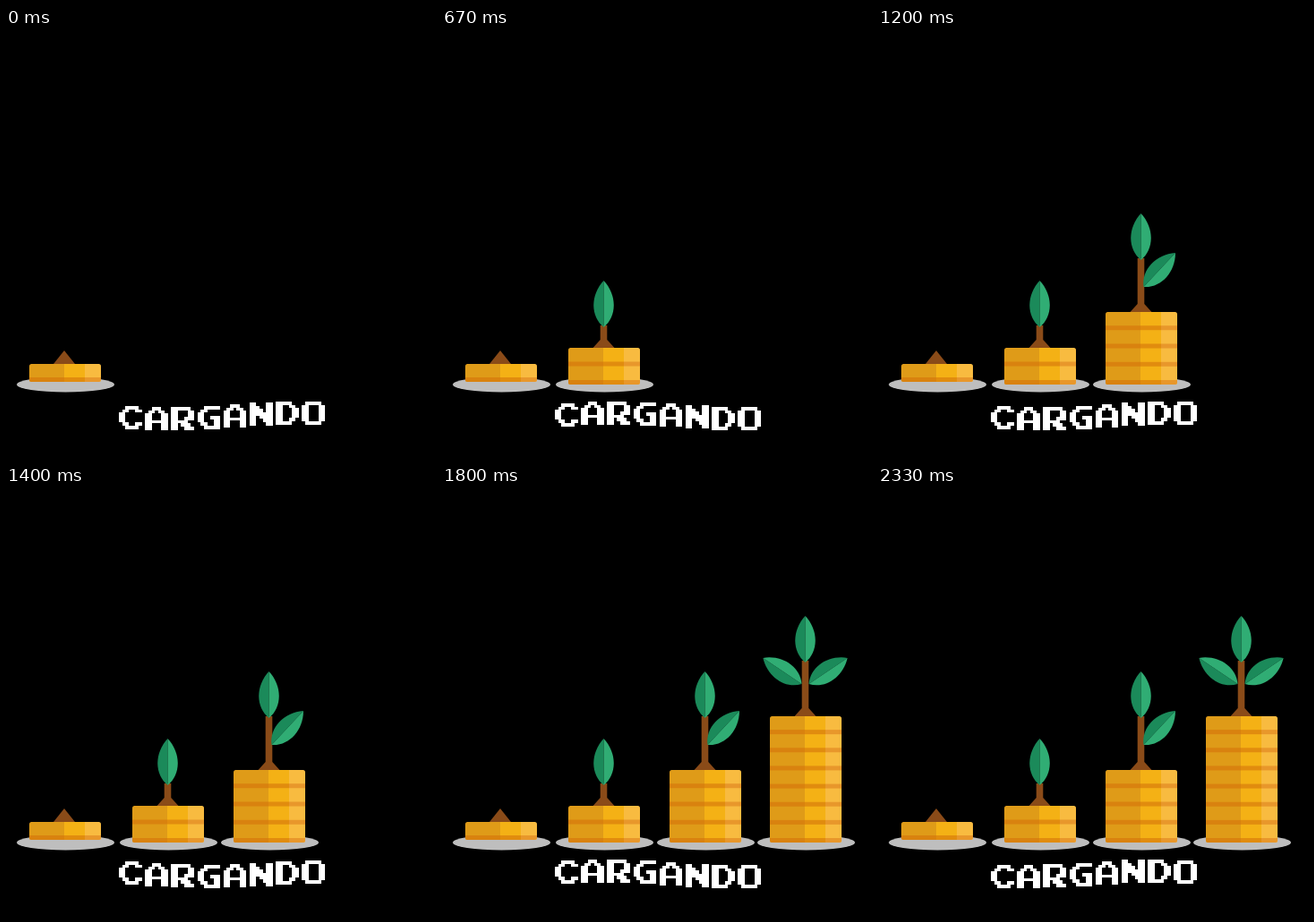
Recreate the animation shown at these times as an HTML page. Size 480x480 px, loop 2.39 s.

```html
<!DOCTYPE html>
<html lang="es">
<head>
<meta charset="utf-8">
<title>Cargando</title>
<style>
html, body { margin: 0; width: 100%; height: 100%; overflow: hidden; background: #000; }
svg { display: block; width: 480px; height: 480px; }
</style>
</head>
<body>
<svg id="stage" viewBox="0 0 480 480" role="img" aria-label="CARGANDO">
  <defs>
    <g id="leaf">
      <path d="M0 0C-15 -12 -15 -36 0 -52Z" fill="#1b8a5a"/>
      <path d="M0 0C15 -12 15 -36 0 -52Z" fill="#30ad74"/>
    </g>
  </defs>
</svg>
<script>
const LOOP = 2390, FRAME = LOOP / 36, PILE_GAP = 600;
const WAVE_TIME = LOOP / 2, WAVE_LETTERS = 10, WAVE_HEIGHT = 3;
const PIXEL = 3.65, TEXT_X = 126, TEXT_Y = 420;
const BROWN = '#8a4b18';
const stage = document.getElementById('stage');

// x, top, bottom, coins, stem top, leaves as [dx, y, angle]
const piles = [
  [26, 375, 395, 1, 0, []],
  [141, 357, 398, 2, 332, [[0, 334, 0]]],
  [254, 317, 398, 4, 257, [[0, 259, 0], [3, 289, 43]]],
  [366, 257, 398, 7, 195, [[0, 197, 0], [-4, 221, -56], [4, 221, 56]]]
];

// seven rows per letter, one bit per pixel
const glyphs = {
  C: [0x1e, 0x33, 0x60, 0x60, 0x60, 0x33, 0x1e],
  A: [0x1c, 0x36, 0x63, 0x63, 0x7f, 0x63, 0x63],
  R: [0x7e, 0x63, 0x63, 0x67, 0x7c, 0x6e, 0x67],
  G: [0x1f, 0x30, 0x60, 0x67, 0x63, 0x33, 0x1f],
  N: [0x63, 0x73, 0x7b, 0x7f, 0x6f, 0x67, 0x63],
  D: [0x7c, 0x66, 0x63, 0x63, 0x63, 0x66, 0x7c],
  O: [0x3e, 0x63, 0x63, 0x63, 0x63, 0x63, 0x3e]
};

function add(name, attrs, parent = stage) {
  const el = document.createElementNS('http://www.w3.org/2000/svg', name);
  for (const key in attrs) el.setAttribute(key, attrs[key]);
  return parent.appendChild(el);
}

function bands(x, y, h, colors, parent) {
  [[0, 39], [39, 23], [62, 18]].forEach(([dx, width], i) =>
    add('rect', { x: x + dx, y, width, height: h, fill: colors[i] }, parent));
}

function drawPile([x, top, bottom, coins, stem, leaves], i) {
  const g = add('g', {}), cx = x + 39.5, h = (bottom - top) / coins;
  add('ellipse', { cx: x + 40.5, cy: 398, rx: 54.5, ry: 8.5, fill: '#bebebe' }, g);
  const clip = add('clipPath', { id: 'pile' + i }, g);
  add('rect', { x, y: top, width: 80, height: bottom - top, rx: 2.5 }, clip);
  const stack = add('g', { 'clip-path': `url(#pile${i})` }, g);
  bands(x, top, bottom - top, ['#df9b18', '#f4b115', '#f8bb40'], stack);
  for (let n = 1; n <= coins; n++)
    bands(x, top + n * h - 5, 5, ['#d9820f', '#e18c0e', '#e8972b'], stack);

  const d = stem
    ? `M${cx - 3.8} ${stem}h7.6V${top - 9}L${cx + 12} ${top}H${cx - 12}L${cx - 3.8} ${top - 9}Z`
    : `M${cx - .5} ${top - 15}L${cx + 11.5} ${top}H${cx - 12.5}Z`;
  add('path', { d, fill: BROWN }, g);
  for (const [dx, y, angle] of leaves)
    add('use', { href: '#leaf', transform: `translate(${cx + dx} ${y}) rotate(${angle})` }, g);
  return g;
}

function drawLetter(char, i) {
  let d = '';
  glyphs[char].forEach((row, y) => {
    for (let x = 0; x < 7; x++)
      if (row >> (6 - x) & 1) d += `M${x} ${y}h1v1h-1z`;
  });
  const g = add('g', {});
  add('path', {
    d, fill: '#fff', 'shape-rendering': 'crispEdges',
    transform: `translate(${TEXT_X + i * 8 * PIXEL} ${TEXT_Y}) scale(${PIXEL})`
  }, g);
  return g;
}

const pileEls = piles.map(drawPile);
const letterEls = [...'CARGANDO'].map(drawLetter);

function render(now) {
  const t = now % LOOP;
  const held = Math.floor(t / FRAME + .05) * FRAME;
  pileEls.forEach((el, i) =>
    el.setAttribute('visibility', t >= i * PILE_GAP - 2 ? 'visible' : 'hidden'));
  letterEls.forEach((el, i) => {
    const phase = held / WAVE_TIME + .134 - i / WAVE_LETTERS;
    const dy = Math.round(WAVE_HEIGHT * Math.cos(2 * Math.PI * phase));
    el.setAttribute('transform', `translate(0 ${dy})`);
  });
}

let start;
function tick(now) {
  start ??= now;
  render(now - start);
  requestAnimationFrame(tick);
}
render(0);
requestAnimationFrame(tick);
</script>
</body>
</html>
```
